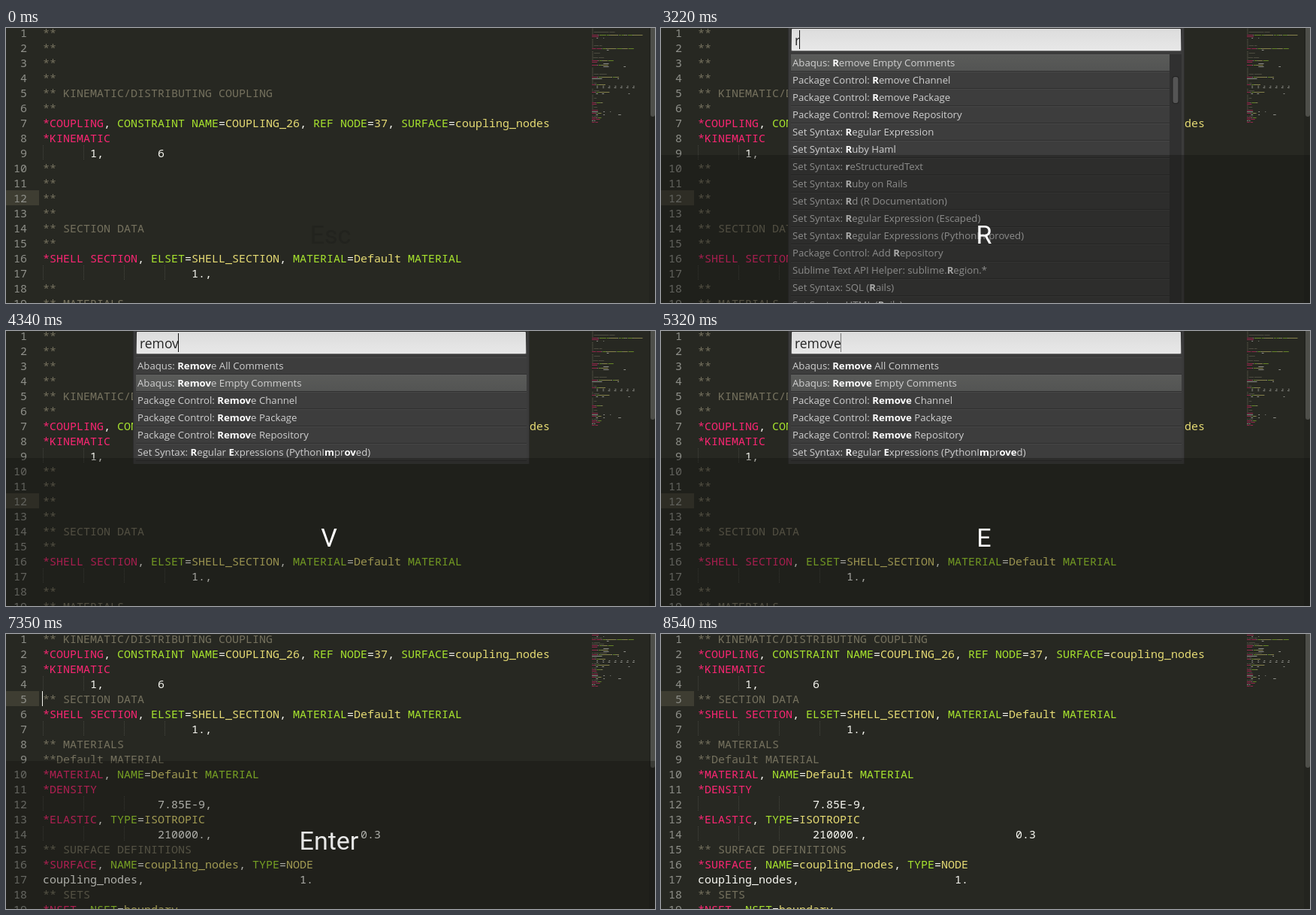
These frames come from a looping animation (864 by 366 pixels, 8680 ms). An HTML page with a canvas:

```html
<!DOCTYPE html>
<html lang="en">
<head>
<meta charset="utf-8">
<title>Removing empty comments</title>
<style>
html, body { margin: 0; width: 100%; height: 100%; overflow: hidden; background: #272822; }
canvas { display: block; }
</style>
</head>
<body>
<canvas id="stage" width="864" height="366"></canvas>
<script>
const W = 864, H = 366, LOOP = 8680, STEP = 70, ROW = 23, KEYS_TOP = 169;
const ctx = document.getElementById('stage').getContext('2d');
const MONO = '15px "Noto Sans Mono", monospace';
const SANS = '"Open Sans", sans-serif';
const color = { comment: '#75715e', keyword: '#f92672', key: '#a6e22e', value: '#e6db74', plain: '#f8f8f2' };

const before = `**
**
**
**
** KINEMATIC/DISTRIBUTING COUPLING
**
*COUPLING, CONSTRAINT NAME=COUPLING_26, REF NODE=37, SURFACE=coupling_nodes
*KINEMATIC
       1,        6
**
**
**
**
** SECTION DATA
**
*SHELL SECTION, ELSET=SHELL_SECTION, MATERIAL=Default MATERIAL
                      1.,
**
** MATERIALS
**
**
**Default MATERIAL
**
*MATERIAL, NAME=Default MATERIAL
*DENSITY
                 7.85E-9,
*ELASTIC, TYPE=ISOTROPIC
                 210000.,                      0.3
**
**
**
**
** SURFACE DEFINITIONS
**
*SURFACE, NAME=coupling_nodes, TYPE=NODE
coupling_nodes,                       1.
**
**
** SETS
*NSET, NSET=boundary
       1,       2,       3,       4,       5,       6,       7,
       8,       9,      10,      11,      12,      13,      14,
**
** ELEMENTS
*NSET, NSET=coupling_nodes
      37,      38,                                    41
**
**
** STEP
**
**
*STEP, NLGEOM=NO
*STATIC
**
** LOADS
**
*BOUNDARY
boundary,        1,        6
*CLOAD, OP=NEW
      37,        2,                    100.
** OUTPUT
*OUTPUT, FIELD
*NODE OUTPUT
U, RF
*END STEP`.split('\n');
const after = before.filter(line => line !== '**');

// Bars switch between normal and bold.
const removes = head => {
  const tail = 'Remove'.slice(head.length);
  return ['Abaqus: |#All Comments', 'Abaqus: |#Empty Comments', 'Package Control: |#Channel',
    'Package Control: |#Package', 'Package Control: |#Repository'].map(s => s.replace('#', `${head}|${tail} `));
};
const improved = 'Set Syntax: |R|egular |E|xpressions (PythonI|m|pr|';
const lists = {
  '': ['Abaqus: Remove Empty Comments', 'Abaqus: Remove All Comments', 'Export to BBCode: Show Export Menu',
    'Export to HTML: Show Export Menu', 'Export to HTML: Toggle Annotation Mode', 'Package Control: Add Repository',
    'Package Control: Remove Channel', 'Package Control: Remove Package', 'Package Control: Remove Repository',
    'Permute Lines: Reverse', 'Permute Lines: Shuffle', 'Permute Lines: Unique', 'Set Syntax: HTML (Rails)',
    'Set Syntax: Ruby Haml', 'Set Syntax: Ruby on Rails'],
  r: ['Abaqus: |R|emove Empty Comments', ...removes('R').slice(2), 'Set Syntax: |R|egular Expression',
    'Set Syntax: |R|uby Haml', 'Set Syntax: |r|eStructuredText', 'Set Syntax: |R|uby on Rails',
    'Set Syntax: |R|d (R Documentation)', 'Set Syntax: |R|egular Expression (Escaped)',
    'Set Syntax: |R|egular Expressions (PythonImproved)', 'Package Control: Add |R|epository',
    'Sublime Text API Helper: sublime.|R|egion.*', 'Set Syntax: SQL (|R|ails)', 'Set Syntax: HTML (|R|ails)'],
  re: [...removes('Re'), 'Set Syntax: |Re|gular Expression', 'Set Syntax: |re|StructuredText',
    'Set Syntax: |Re|gular Expression (Escaped)', 'Set Syntax: |Re|gular Expressions (PythonImproved)',
    'Package Control: Add |Re|pository', 'Sublime Text API Helper: sublime.|Re|gion.*', 'Permute Lines: |Re|verse',
    'Expo|r|t to BBCode: Show |E|xport Menu', 'Expo|r|t to HTML: Show |E|xport Menu', 'Set Syntax: |R|d (R Docum|e|ntation)'],
  rem: [...removes('Rem'), 'Expo|r|t to BBCode: Show |E|xport |M|enu', 'Expo|r|t to HTML: Show |E|xport |M|enu',
    'Set Syntax: |R|egular |E|xpressions (PythonI|m|proved)', 'Set Syntax: Rd (R Documentation)',
    'Expo|r|t to HTML: Toggl|e| Annotation |M|ode', 'Set Syntax: JSON Gene|r|ic Array |E|le|m|ents',
    'Set Syntax: Json Gene|r|ic Object |E|le|m|ents', 'Permute Lines: Reverse', 'Permute Lines: Shuffle',
    'Permute Lines: Unique'],
  remo: [...removes('Remo'), improved + 'o|ved)', 'Expo|r|t to HTML: Toggl|e| Annotation |Mo|de'],
  remov: [...removes('Remov'), improved + 'ov|ed)'],
  remove: [...removes('Remove'), improved + 'ove|d)']
};
const thumbs = { '': [39, 60], r: [64, 101], re: [45, 110], rem: [39, 253] };

// start time, pressed keys, palette query (absent when closed)
const timeline = [
  [0, ''], [1680, 'Shift'], [1750, 'Shift+Ctrl'], [2310, 'Shift+Ctrl+P'], [2380, 'Shift+Ctrl+P', ''],
  [3220, 'R', 'r'], [3430, 'E', 're'], [3710, 'M', 'rem'], [3990, 'O', 'remo'],
  [4340, 'V', 'remov'], [4410, 'E', 'remove'], [5390, 'Enter']
];
const EDITED = 5460;
const editorBlinks = [[350, 770], [1260, 1680], [2275, 5400], [5425, 5950], [6440, 7035], [7245, 7770], [8190, 8470]];
const inputBlinks = [[2345, 2730], [3185, 4690], [4865, 5320]];

const clamp = v => Math.max(0, Math.min(1, v));
const blink = (t, spans) => Math.max(...spans.map(([on, off]) =>
  Math.min(clamp((t - on + 35) / 70), clamp((off + 35 - t) / 70))));

function rect(x, y, w, h, fill) {
  ctx.fillStyle = fill;
  ctx.fillRect(x, y, w, h);
}

function pill(x, y, w, h, r, fill) {
  ctx.fillStyle = fill;
  ctx.beginPath();
  ctx.roundRect(x, y, w, h, r);
  ctx.fill();
}

function text(s, x, y, font, fill, align = 'left') {
  ctx.font = font;
  ctx.fillStyle = fill;
  ctx.textAlign = align;
  ctx.fillText(s, x, y);
}

function vertical(y0, y1, from, to) {
  const g = ctx.createLinearGradient(0, y0, 0, y1);
  g.addColorStop(0, from);
  g.addColorStop(1, to);
  return g;
}

// Splits a line into [column, text, color].
function tokens(line) {
  if (line.startsWith('**')) return [[0, line, color.comment]];
  if (!line.startsWith('*')) return [[0, line, color.plain]];
  return [...line.matchAll(/^\*[^,]+|(?<==)\w+|[=,]|[^=,]+/g)].map(m => {
    const s = m[0], i = m.index;
    const kind = i === 0 ? 'keyword' : /[=,]/.test(s) ? 'plain' : line[i - 1] === '=' ? 'value' : 'key';
    return [i, s, color[kind]];
  });
}

function drawMinimap(lines) {
  ctx.globalAlpha = 0.5;
  lines.forEach((line, i) => {
    for (const [col, s, fill] of tokens(line))
      for (const m of s.matchAll(/\S+/g))
        rect(780 + (col + m.index) * 0.9, 2 * i - 3, m[0].length * 0.9, 1, fill);
  });
  ctx.globalAlpha = 1;
}

function drawEditor(t, paletteOpen) {
  const edited = t >= EDITED, lines = edited ? after : before;
  const current = edited ? 5 : 12, top = 20 * current - 24;
  rect(0, 0, W, H, '#272822');
  rect(0, top, 44, 20, '#3e3d32');
  lines.slice(0, 19).forEach((line, i) => {
    const y = 20 * i + 12;
    text(i + 1, 28, y, MONO, '#8f908a', 'right');
    const indent = line.search(/\S/);
    for (let col = 0; col < indent; col += 6)
      for (let d = 0; d < 20; d += 2) rect(49 + col * 9, y - 16 + d, 1, 1, '#464740');
    for (const [col, s, fill] of tokens(line)) text(s, 49 + col * 9, y, MONO, fill);
  });
  drawMinimap(lines);
  rect(856, 0, 8, H, '#23241f');
  pill(858, -6, 6, (edited ? 178 : 118) + 6, 3, '#4e4f4a');
  if (!paletteOpen) {
    ctx.globalAlpha = blink(t, editorBlinks);
    rect(edited ? 48 : 66, top, 1, 20, '#f8f8f0');
    ctx.globalAlpha = 1;
  }
}

function drawPalette(t, query) {
  const items = lists[query], thumb = thumbs[query];
  const bottom = thumb ? H + 10 : 39 + ROW * items.length;
  const right = thumb ? 677 : 693;
  const selected = query.length < 2 ? 0 : 1;

  pill(169, -6, 528, bottom + 6, 2, '#3b3b3b');
  rect(169, 0, 1, bottom, '#2d2d2d');
  rect(696, 0, 1, bottom, '#2d2d2d');
  pill(173, 0, 520, 31, 2, vertical(0, 31, '#222', '#777'));
  pill(174, 1, 518, 29, 1, vertical(1, 30, '#dcdcdc', '#e8e8e8'));
  text(query, 178, 23, '17.5px ' + SANS, '#252525');
  ctx.globalAlpha = blink(t, inputBlinks);
  rect(Math.floor(177.6 + ctx.measureText(query).width), 3, 1, 25, '#111');
  ctx.globalAlpha = 1;

  items.forEach((item, i) => {
    const y = 35 + ROW * i;
    rect(173, y, right - 173, ROW, i === selected ? vertical(y, y + ROW, '#5a5b59', '#535453') : '#3d3d3d');
    rect(173, y, right - 173, 1, i === selected ? '#5e5e5e' : '#474747');
    rect(173, y + ROW - 1, right - 173, 1, '#2f2f2f');
    let x = 175;
    item.split('|').forEach((part, n) => {
      const bold = n % 2;
      text(part, x, y + 16, (bold ? 'bold ' : '') + '13.2px ' + SANS, bold ? '#fff' : '#d0d0d0');
      x += ctx.measureText(part).width;
    });
  });
  if (thumb) {
    rect(677, 35, 16, H, '#303030');
    pill(680.5, thumb[0], 9, thumb[1] - thumb[0], 4, '#222');
    pill(681.5, thumb[0] + 1, 7, thumb[1] - thumb[0] - 2, 3, '#555');
  }
}

function drawKeys(t, keys) {
  const font = '34px Roboto, sans-serif';
  if (!keys) {
    text('Esc', 432, 287, font, 'rgba(20,20,16,.22)', 'center');
    return;
  }
  ctx.globalAlpha = Math.min(clamp((t - 1610) / 280), clamp((8540 - t) / 1330));
  rect(0, KEYS_TOP, W, H - KEYS_TOP, 'rgba(17,17,14,.36)');
  text(keys, 430, 287, font, '#fff', 'center');
  ctx.globalAlpha = 1;
}

let shown = -1;
function frame(now) {
  const t = Math.floor(now % LOOP / STEP) * STEP;
  if (t !== shown) {
    shown = t;
    const [, keys, query] = timeline.findLast(([start]) => start <= t);
    const open = query !== undefined;
    drawEditor(t, open);
    if (open) drawPalette(t, query);
    drawKeys(t, keys);
  }
  requestAnimationFrame(() => frame(performance.now()));
}
frame(performance.now());
</script>
</body>
</html>
```
